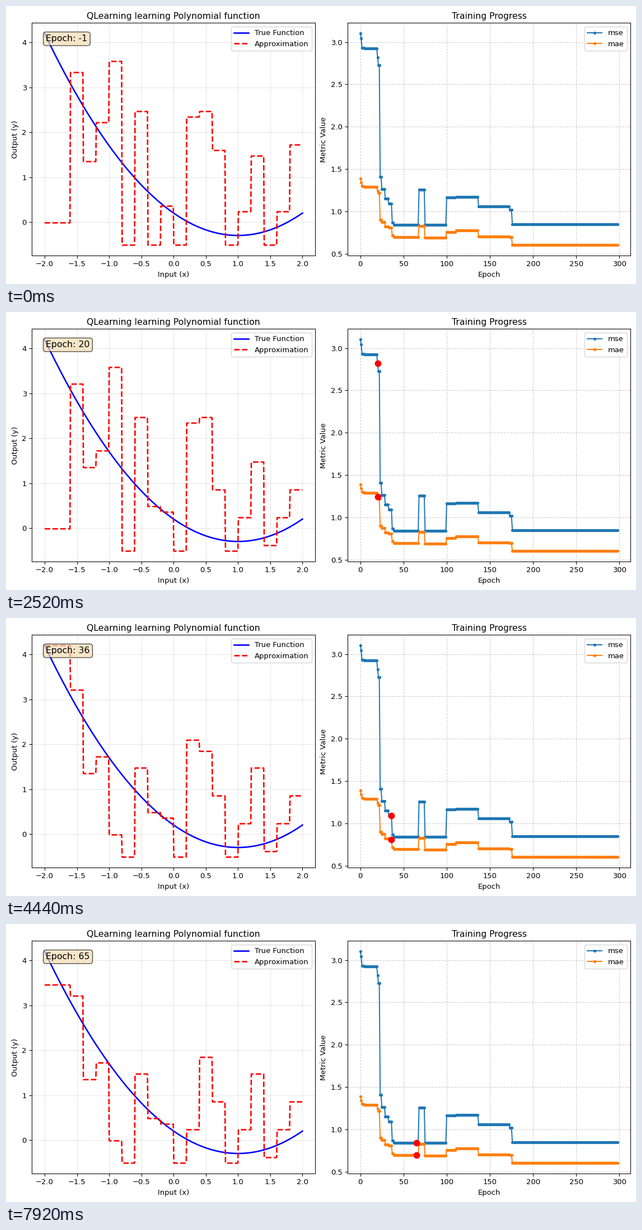
Recreate the animation shown at these times as a matplotlib script. Size 1125 by 498 pixels, loop 8 s.

```python
import numpy as np
import matplotlib.pyplot as plt
from matplotlib.animation import FuncAnimation

W, H, DPI = 1125, 498, 94.5
TICK_MS, LOOP_MS, TICKS_PER_EPOCH = 40, 8000, 3
EPOCHS = np.arange(299)

# The learner picks one of evenly spaced output levels for each input cell.
LEVELS = np.linspace(-0.515, 4.2, 39)
START = [4, 31, 15, 22, 33, 0, 24, 0, 7, 0, 23, 24, 17, 0, 6, 16, 0, 6, 18]

# Choices it revises while training: (epoch, cell, new level)
UPDATES = [
    (1, 7, 8), (2, 12, 11), (3, 1, 30), (5, 16, 1), (8, 3, 18),
    (20, 18, 11), (21, 4, 4), (23, 0, 38), (25, 11, 19), (29, 6, 16),
    (33, 10, 21), (37, 10, 6), (39, 0, 32), (68, 13, 25), (75, 13, 1),
    (100, 5, 38), (111, 13, 5), (137, 4, 18), (173, 5, 37),
    (176, 15, 2), (176, 2, 17),
]


def true_function(x):
    return 0.5 * x**2 - x + 0.2


def approximate(x, epoch):
    """Step function the learner holds after the given epoch."""
    choice = np.array(START)
    for when, cell, level in UPDATES:
        if when <= epoch:
            choice[cell] = level
    cells = np.clip(np.floor((x + 2) / 0.2).astype(int), 1, 19) - 1
    return LEVELS[choice[cells]]


def padded(values):
    low, high = np.min(values), np.max(values)
    margin = 0.05 * (high - low)
    return low - margin, high + margin


def add_axes(left, right, xlim, ylim, title, xlabel, ylabel):
    """Axes placed by pixel columns, sharing top and bottom."""
    top, bottom = 30.4, 447.3
    ax = fig.add_axes([left / W, 1 - bottom / H,
                       (right - left) / W, (bottom - top) / H])
    ax.set(xlim=xlim, ylim=ylim, title=title, xlabel=xlabel, ylabel=ylabel)
    return ax


# Errors over the whole training run, measured on a fixed set of points
points = np.linspace(-2, 2, 200)
errors = np.array([approximate(points, e) - true_function(points)
                   for e in EPOCHS])
mse = (errors**2).mean(axis=1)
mae = np.abs(errors).mean(axis=1)

plt.rcParams["font.family"] = "DejaVu Sans"
fig = plt.figure(figsize=(W / DPI, H / DPI), dpi=DPI, facecolor="white")

# Function panel
x = np.linspace(-2, 2, 500)
ax_fn = add_axes(46, 552.4, padded(x), padded(LEVELS),
                 "QLearning learning Polynomial function",
                 "Input (x)", "Output (y)")
ax_fn.set_xticks(np.arange(-2, 2.1, 0.5))
ax_fn.set_yticks(range(5))
ax_fn.grid(True, alpha=0.3)
ax_fn.plot(x, true_function(x), "b-", lw=2, label="True Function")
approx, = ax_fn.plot(x, approximate(x, -1), "r--", lw=2,
                     label="Approximation")
ax_fn.legend(loc="upper right")
counter = ax_fn.text(0.05, 0.95, "", transform=ax_fn.transAxes, fontsize=12,
                     va="top", bbox=dict(boxstyle="round", facecolor="wheat",
                                         alpha=0.7))

# Metrics panel
ax_hist = add_axes(609.7, 1115.4, padded(EPOCHS), padded([mse, mae]),
                   "Training Progress", "Epoch", "Metric Value")
ax_hist.set_xticks(range(0, 301, 50))
ax_hist.set_yticks(np.arange(0.5, 3.1, 0.5))
ax_hist.grid(True, linestyle="--", alpha=0.6)
ax_hist.plot(EPOCHS, mse, marker=".", label="mse")
ax_hist.plot(EPOCHS, mae, marker=".", label="mae")
ax_hist.legend(loc="upper right")
dots, = ax_hist.plot([], [], "ro", markersize=8, zorder=3)


def update(tick):
    epoch = tick // TICKS_PER_EPOCH - 1
    approx.set_ydata(approximate(x, epoch))
    counter.set_text(f"Epoch: {epoch}")
    if epoch < 0:
        dots.set_data([], [])
    else:
        dots.set_data([epoch, epoch], [mse[epoch], mae[epoch]])
    return approx, counter, dots


def reset():
    return update(0)


anim = FuncAnimation(fig, update, frames=LOOP_MS // TICK_MS, init_func=reset,
                     interval=TICK_MS, repeat=True, repeat_delay=0)
plt.show()
```
